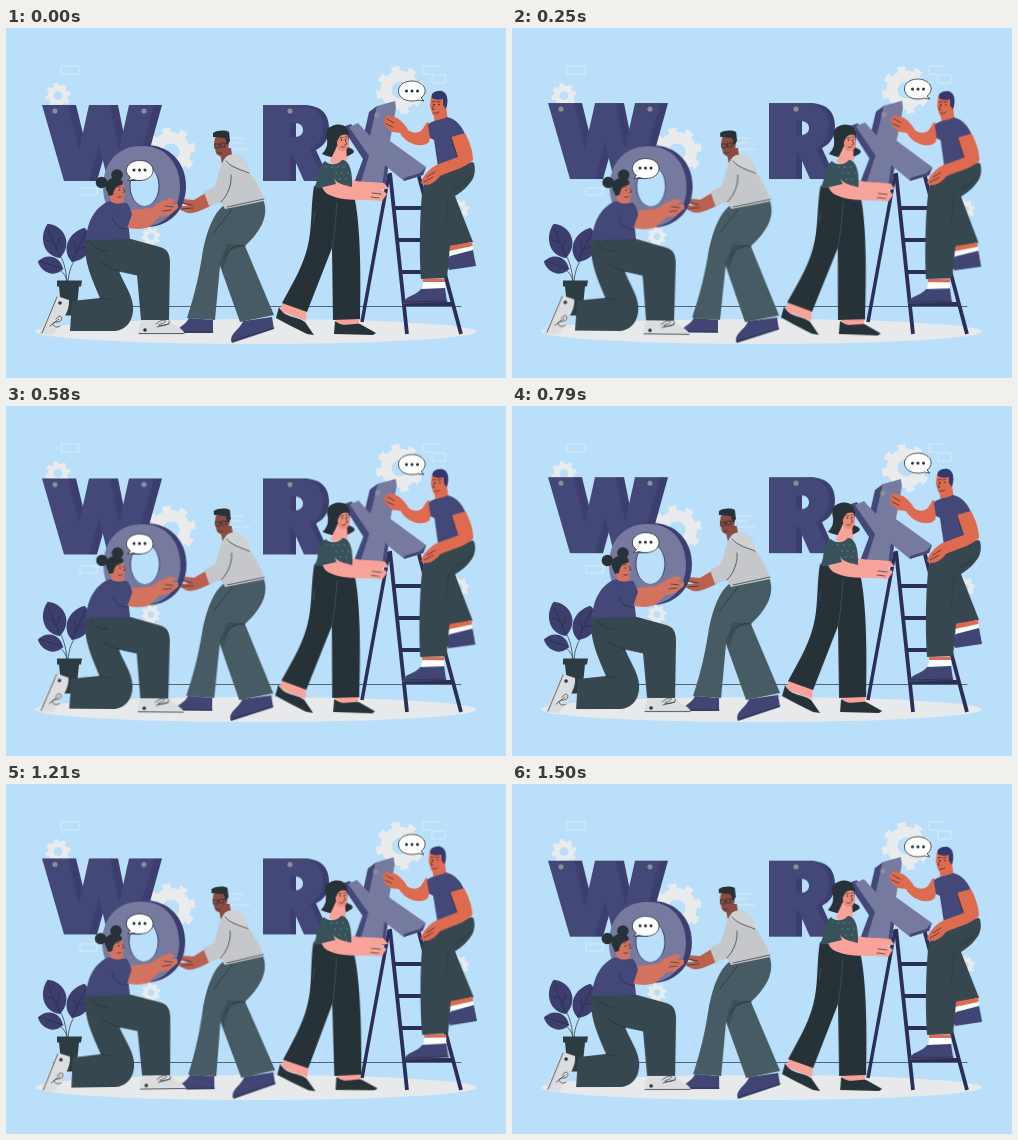
An HTML page without scripts that plays this animation: 500x350 px, repeating every 1540 ms.

```html
<!DOCTYPE html>
<html lang="en">
<head>
<meta charset="utf-8">
<title>Work together</title>
<style>
html, body { margin: 0; width: 100%; height: 100%; overflow: hidden; background: #badffa; }
svg { display: block; width: 100vw; height: 100vh; }
.float { animation: float 1540ms linear infinite; }
.sway { animation: sway 1540ms linear infinite; }
#kneeler { transform-origin: 106px 213px; }
#carrier { transform-origin: 220px 208px; }
#pusher { transform-origin: 325px 202px; }
#climber { transform-origin: 405px 169px; }
@keyframes float { 50% { transform: translateY(-6px); } }
@keyframes sway { 25% { transform: rotate(1deg); } 75% { transform: rotate(-1deg); } }
.navy { fill: #444878; }
.deep { fill: #3b3e6e; }
.shoe { fill: #414574; }
.ink { fill: #263238; }
.denim { fill: #37474f; }
.slate { fill: #475b65; }
.coral { fill: #de6a50; }
.clay { fill: #d47260; }
.rose { fill: #f8a39a; }
.brown { fill: #8b4b40; }
.line { fill: none; stroke: #263238; stroke-width: .7; stroke-linecap: round; stroke-linejoin: round; }
.thin { fill: none; stroke: #e4eef5; stroke-width: .8; }
.shade { fill: #263238; opacity: .3; }
</style>
</head>
<body>
<svg viewBox="0 0 500 350">
<defs>
  <g id="gear" fill="none" stroke="#e9ebec" transform="rotate(22.5)">
    <circle r="5.8" stroke-width="4.6"/>
    <circle r="8.7" stroke-width="2.6" pathLength="16" stroke-dasharray=".95 1.05"/>
  </g>
  <path id="w" d="M36 77H62L73 122 83 77H104L113 122 123 77H148L127 153H102L93 117 83 153H58Z"/>
  <path id="r" fill-rule="evenodd" d="M257 77h34c18 0 26 9 26 23 0 11-5 18-13 22l14 31h-20l-12-27h-2v27h-27zM284 95v14h5c5 0 8-3 8-7s-3-7-8-7z"/>
  <path id="leaf" d="M0 0C-16-5-17-25-5-36 11-31 16-11 0 0Z"/>
  <g id="dots" class="ink"><circle cx="-5.5" r="1.5"/><circle r="1.5"/><circle cx="5.5" r="1.5"/></g>
  <path id="bubble" d="M-9 7C-18 0-11-10 0-10 18-10 18 10 0 10-3 10-5 9.5-6 9L-12 10Z" fill="#fff" stroke="#263238" stroke-width=".8"/>
  <circle id="pin" r="2.6" fill="#8d8f98"/>
</defs>

<!-- backdrop -->
<rect width="500" height="350" fill="#badffa"/>
<use href="#gear" transform="translate(52 67.500) scale(1.25)"/>
<use href="#gear" transform="translate(165 124) scale(2.45)"/>
<use href="#gear" transform="translate(145 208.500) scale(.95)"/>
<use href="#gear" transform="translate(394 62) scale(2.4)"/>
<use href="#gear" transform="translate(453 181.500)"/>
<path class="thin" d="M55 38h18v8h-18zM74 160h17v7h-17zM417 38h17M417 38v8h8M426 47h13v8h-13zM222 110h16M226 115h10M222 121h22"/>
<ellipse cx="249.5" cy="303.5" rx="220.5" ry="12.5" fill="#e8e9ea"/>
<path class="line" d="M47 278.500H455"/>

<!-- plant -->
<g class="deep">
  <path class="line" d="M61 254C60 240 57 231 52 224M62 254C63 242 66 236 70 230M61 254C60 246 55 242 50 240"/>
  <use href="#leaf" transform="translate(54 230) rotate(-12)"/>
  <use href="#leaf" transform="translate(66 234) rotate(28)"/>
  <use href="#leaf" transform="translate(57 241) rotate(-66) scale(.72)"/>
  <path class="line" d="M54 229L42 201M66 233L80 204M57 241L33 233M48 215l-8-3M50 221l4-11M72 221l10-3M70 225l-1-10"/>
</g>
<path fill="#2d3b43" d="M51 252.500h25l-1 6h-2l-3 29h-14l-3-29h-2z"/>

<!-- floating letters -->
<g class="float">
  <use href="#w" x="8" class="deep"/><use href="#w" x="4" class="deep"/><use href="#w" class="navy"/>
  <use href="#r" x="6" class="deep"/><use href="#r" x="3" class="deep"/><use href="#r" class="navy"/>
  <use href="#pin" x="49" y="83"/><use href="#pin" x="138" y="83"/><use href="#pin" x="284" y="83"/>
</g>

<!-- ladder -->
<g fill="none" stroke="#2b2e5b">
  <path d="M383 146L356 294" stroke-width="3.500"/>
  <path d="M386 180H418M390 212H426M394 244H436M397 276H446" stroke-width="4"/>
  <path d="M384 145L401 306M412 145L455 306" stroke-width="3.800"/>
</g>

<g id="climber" class="sway">
  <!-- letter X -->
  <path class="navy" d="M371 78L363 84 358 106 368 116ZM345 96L336 99 357 131 348 155 356 157 364 126Z"/>
  <path fill="#777a9f" d="M371 78L389 73 390 80 384 113 420 139 417 147 398 153 382 140 379 161 354 157 363 128 343 99 352 95 364 108Z"/>
  <path class="navy" d="M420 139l-3 8-19 6 0-3 16-5zM382 140l-3 21-3-2 3-22z"/>
  <use href="#pin" x="371" y="87"/>
  <!-- rear leg -->
  <path class="denim" d="M432 140L468 135C471 148 463 160 449 168L467 214 443 220 429 170Z"/>
  <path fill="#fff" d="M442 219L466 214 467 225 444 230Z"/>
  <path class="coral" d="M442 218L466 214 466.500 218 443 223Z"/>
  <path class="shoe" d="M444 228L467 222 470 238 443 242C440 236 441 232 444 228Z"/>
  <!-- front leg -->
  <path class="denim" d="M431 139L467 134C472 148 466 157 449 165L441 250 415 251C413 222 414 186 416 166 418 150 424 142 431 139Z"/>
  <path class="shade" d="M466 147C461 157 452 161 444 164L438 210 441 170C445 159 458 155 466 147Z"/>
  <path class="coral" d="M417 251h22v4h-22z"/>
  <path fill="#fff" d="M417 254h22v9h-23z"/>
  <path class="shoe" d="M415 261L439 260 441 274 397 276C398 268 410 268 415 261Z"/>
  <path class="line" stroke="#fff" d="M398 274l43-1"/>
  <!-- torso and arms -->
  <path class="coral" d="M427 97L423 114C416 121 400 116 394 105L386 104 379 98 378 91 382 87 391 90C396 93 400 98 402 102 407 106 413 105 416 102L421 94Z"/>
  <path class="line" d="M381 91l7 4M380 96l7 3"/>
  <path class="coral" d="M427 82l13-3 2 14-13 3z"/>
  <path class="navy" d="M422 97C427 91 434 93 441 89 450 91 455 97 459 106L457 134 432 139 428 112 424 110Z"/>
  <path class="coral" d="M445 109L459 105C464 114 467 124 467 132 458 141 444 143 434 148 427 157 419 159 415 155 417 147 425 139 433 136L452 129Z"/>
  <path class="line" d="M445 109l6 19M421 149l8-5M418 154l9-5"/>
  <!-- head -->
  <path class="coral" d="M425 69C427 65 439 66 441 72L439 85C435 91 428 91 426 85L424 78Z"/>
  <path fill="#34376d" d="M426 70C424 65 430 62 436 63 443 65 442 76 440 81L437 77 437 71C433 72 429 72 426 70Z"/>
  <path class="line" d="M426 74l3-.5M431 74l3-.5M428 77l-2 4 2 .5M428 85q3 1 5-1"/>
  <circle class="ink" cx="428" cy="76.500" r=".8"/><circle class="ink" cx="433" cy="76.500" r=".8"/>
</g>

<g id="pusher" class="sway">
  <!-- feet -->
  <path class="rose" d="M278 271L301 280 300 293 274 283ZM330 286h23v11h-23z"/>
  <path class="ink" d="M273 279C278 290 291 288 299 294L308 307 301 306 283 297 270 290ZM329 293C337 300 346 295 354 296L370 305 367 307 328 306Z"/>
  <!-- trousers -->
  <path class="ink" d="M308 158L346 160C355 187 355 250 354 291L327 292 326 220 301 284 276 275C288 253 299 235 303 212 306 195 305 175 308 158Z"/>
  <path fill="none" stroke="#475a62" stroke-width=".7" d="M331 174C330 192 328 208 326 221M309 184L307 195"/>
  <!-- head -->
  <path class="ink" d="M326 98C336 94 343 99 343 107L342 119C349 122 350 124 344 127 337 132 324 130 316 126 321 121 322 116 321 111 319 104 321 100 326 98Z"/>
  <path class="rose" d="M331 118H340L341 132C336 139 326 138 324 133Z"/>
  <path fill="#ee8b78" d="M329 106C335 101 341 103 342 109L343 116C342 123 337 125 332 121Z"/>
  <path class="ink" d="M322 105C328 98 338 98 342 107 336 105 333 108 331 114L328 124 321 124Z"/>
  <path class="line" d="M334 110l3-.5M339 109l2 0M339 112l2 4-2 .5M335 119q2 1 4-.5"/>
  <circle class="ink" cx="335.500" cy="112" r=".8"/><circle class="ink" cx="340" cy="111.500" r=".7"/>
  <!-- blouse and arms -->
  <path class="rose" d="M334 148C345 153 356 154 365 154L378 155 383 161 365 161 336 162Z"/>
  <path fill="#37525a" d="M319 133C324 138 332 137 336 132 343 132 347 142 346 161L308 160C314 150 310 140 319 133Z"/>
  <path fill="none" stroke="#a9bdc1" stroke-linecap="round" stroke-dasharray="0 6" d="M320 139h23M318 145h27M322 151h22M335 157h10"/>
  <path class="rose" d="M315 154L328 151C332 157 347 160 359 160L374 160 381 166 376 173 363 172C350 172 334 172 326 168 319 166 316 161 315 154Z"/>
  <path fill="#37525a" d="M313 141C319 136 325 140 326 145L330 156 313 160C311 153 311 146 313 141Z"/>
  <path class="line" d="M366 165l9 1M365 169l8 1"/>
</g>

<g id="carrier" class="sway">
  <!-- shoes and trousers -->
  <path class="shoe" d="M183 290L207 292 207 305 170 305C171 299 179 298 183 290ZM237 293L266 289 268 301 226 315C222 306 234 302 237 293Z"/>
  <path class="line" stroke="#c9cad8" d="M170 304h37M226 313l42-13"/>
  <path class="slate" d="M217 178L257 171C263 186 257 201 239 218L268 287 234 294 214 238 209 292 181 290C189 266 194 243 197 222 201 203 207 186 217 178Z"/>
  <path class="shade" d="M239 218L224 222 217 242 214 234 221 216Z"/>
  <path class="line" stroke="#2c3b43" d="M239 218C230 216 224 220 218 230M226 181C220 190 213 197 208 205"/>
  <!-- arms and hoodie -->
  <path fill="#b9604f" d="M207 162L209 175C199 181 190 186 181 185L173 181 172 178 182 178 174 174 176 171 188 172C195 168 200 164 207 162Z"/>
  <path class="line" d="M176 181l11-1M176 175l10 2"/>
  <path class="brown" d="M213 120h12l2 15-11 1z"/>
  <path fill="#c6c7ca" d="M220 129C230 121 244 133 243 144 251 154 256 164 258 173L219 181 215 174 203 178 198 164 209 158C213 146 214 135 220 129Z"/>
  <path fill="#d0d1d3" d="M220 129C230 121 244 133 243 145 235 142 226 138 218 134Z"/>
  <path class="line" d="M220 133C226 140 236 142 243 145M225 147C226 156 222 167 215 174M221 179l37-8"/>
  <!-- head -->
  <path class="brown" d="M209 110C214 106 222 108 223 113L222 123C220 130 213 130 210 125L208 116Z"/>
  <path class="ink" d="M207 109V105C212 102 219 102 223 104L224 113 221 117 219 110Z"/>
  <path class="line" d="M209 116h4v4h-4zM215 115h4v4h-4zM213 117h2M219 116l3-1M212 125h4"/>
</g>

<g id="kneeler" class="sway">
  <!-- letter O -->
  <path class="deep" fill-rule="evenodd" d="M138 117C163 116 180 134 180 158S164 199 140 199 100 181 100 158 114 117 138 117ZM138 138A14 20 0 1 0 139 178 14 20 0 0 0 138 138Z"/>
  <path fill="#777a9f" fill-rule="evenodd" d="M135 118C159 117 174 135 174 159S158 199 135 199 97 182 97 159 111 118 135 118ZM138 138A15 20 0 1 0 139 178 15 20 0 0 0 138 138Z"/>
  <!-- shoes -->
  <path fill="#dcdde0" d="M51 268L63 272C64 283 56 293 47 307L33 306C38 294 45 281 51 268Z"/>
  <path class="line" d="M51 269L36 305M50 291c6-8 9 3 1 3s-2 8 3 4M44 298l9-7"/>
  <path fill="#dcdde0" d="M136 291H164C165 298 178 299 179 307H133C132 300 134 296 136 291Z"/>
  <path class="line" d="M133 305.500h45M150 296c8-7 14-3 5 0s12 2 8-3M151 299l12-3"/>
  <circle class="ink" cx="139" cy="302" r="1.800"/><circle class="ink" cx="54" cy="275" r="1.800"/>
  <!-- trousers -->
  <path class="denim" d="M80 211H125L154 219C162 221 164 227 164 235L163 292H135L131 247 113 243C117 254 126 266 127 278 128 293 120 302 109 303H64L66 273 94 270C87 253 76 231 80 211Z"/>
  <path class="line" stroke="#202b31" d="M113 243C105 241 99 238 94 233M112 243l19 4M94 270l10 2M85 215c4 6 11 8 17 8"/>
  <!-- torso -->
  <path class="clay" d="M104 166h12l3 12-13 3z"/>
  <path class="clay" d="M118 183C127 182 136 181 145 180L154 174 164 170 170 172 165 176 172 176 172 180 166 185 154 188 143 199C132 202 120 199 115 194Z"/>
  <path class="navy" d="M104 173C111 178 117 174 121 175 126 181 126 187 122 193L124 211 80 212C81 194 89 178 104 173Z"/>
  <path class="clay" d="M113 188L124 185C128 185 139 184 148 181L153 177 163 178 169 181 164 187 153 189 143 199C131 203 119 200 113 196Z"/>
  <path class="navy" d="M108 180C116 174 124 178 126 186L121 201C114 201 109 198 107 194Z"/>
  <path class="line" d="M107 190C108 197 113 201 121 201M159 178l8 1M157 183l8-1"/>
  <!-- head -->
  <path class="clay" d="M106 155C112 151 118 155 118 160L119 165 117 172C112 175 105 173 103 168Z"/>
  <path class="ink" d="M100 161C97 150 112 146 117 154L116 157C110 157 108 161 107 167L103 168Z"/>
  <circle class="ink" cx="111" cy="147" r="5.800"/><circle class="ink" cx="95.500" cy="154.500" r="5.800"/>
  <path class="line" d="M111 159l3-.5M117 160l2 4-2 .5M112 169q3 1 4-.5"/>
  <circle class="ink" cx="113.500" cy="162" r=".8"/>
</g>

<!-- speech bubbles -->
<g class="float">
  <use href="#bubble" x="133.500" y="142.500"/><use href="#dots" x="133.500" y="142"/>
  <use href="#bubble" transform="translate(406 63) scale(-1 1)"/><use href="#dots" x="406" y="63"/>
</g>
</svg>
</body>
</html>
```
